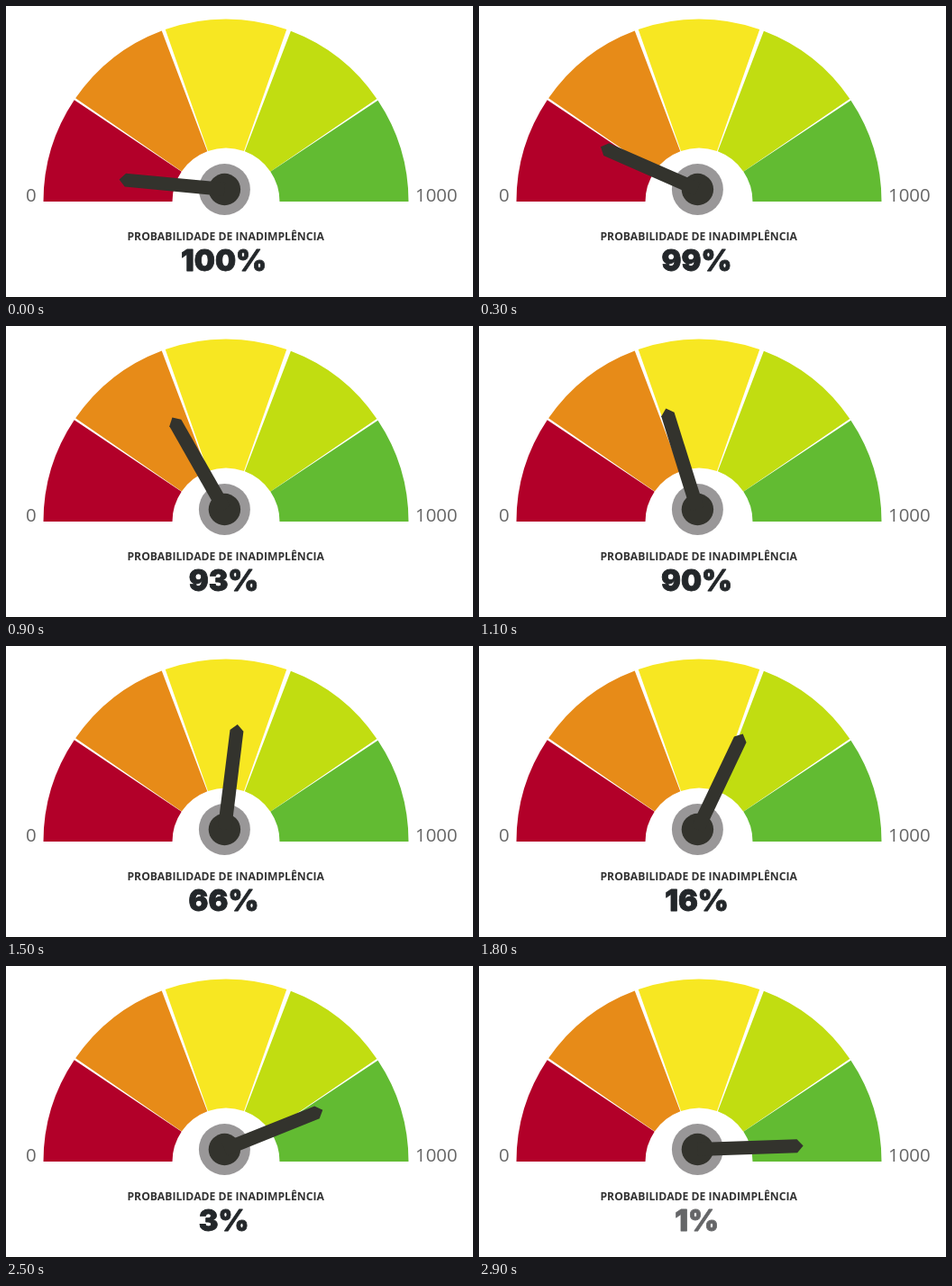
These frames come from a looping animation (518x324 px, 3000 ms). An HTML page with a canvas:

```html
<!DOCTYPE html>
<html lang="pt">
<head>
<meta charset="utf-8">
<style>
  html, body { margin: 0; width: 100%; height: 100%; overflow: hidden; background: #fff; }
  canvas { display: block; }
</style>
</head>
<body>
<canvas id="stage" width="518" height="324"></canvas>
<script>
const ctx = document.getElementById('stage').getContext('2d');
const LOOP = 3000, STEP = 100;
const DARK = '#33332d';
const dial = { x: 244, y: 217, inner: 59.5, outer: 202.5 };
const hub = { x: 242.4, y: 203.5 };

// Start and end angle in degrees, measured clockwise from the left.
const sectors = [
  ['#b20029', 0, 33.8],
  ['#e78b18', 34.5, 69.4],
  ['#f7e722', 70.6, 109.4],
  ['#c1dd11', 110.8, 145.7],
  ['#62bb32', 146.3, 180],
];

// Step number and the percentage reached there.
const risk = [[0, 100], [6, 97], [11, 90], [15, 66], [18, 16], [22, 5], [29, 1]];

const rad = deg => deg * Math.PI / 180;

function riskAt(step) {
  const i = Math.max(1, risk.findIndex(([s]) => s >= step));
  const [s0, v0] = risk[i - 1], [s1, v1] = risk[i];
  return Math.round(v0 + (v1 - v0) * (step - s0) / (s1 - s0));
}

function disc(x, y, r, color) {
  ctx.fillStyle = color;
  ctx.beginPath();
  ctx.arc(x, y, r, 0, 2 * Math.PI);
  ctx.fill();
}

function label(text, x, y, font, color, align = 'center') {
  ctx.font = font;
  ctx.fillStyle = color;
  ctx.textAlign = align;
  ctx.fillText(text, x, y);
}

function drawDial() {
  const flare = rad(0.25); // gaps narrow towards the hub
  for (const [color, from, to] of sectors) {
    const a = Math.PI + rad(from), b = Math.PI + rad(to);
    const innerA = from > 0 ? a - flare : a;
    const innerB = to < 180 ? b + flare : b;
    ctx.fillStyle = color;
    ctx.beginPath();
    ctx.arc(dial.x, dial.y, dial.outer, a, b);
    ctx.arc(dial.x, dial.y, dial.inner, innerB, innerA, true);
    ctx.fill();
  }
}

function drawNeedle(deg) {
  disc(hub.x, hub.y, 28.5, '#999798');
  disc(hub.x, hub.y, 17.7, DARK);
  ctx.save();
  ctx.translate(hub.x, hub.y);
  ctx.rotate(Math.PI + rad(deg));
  ctx.beginPath();
  for (const [x, y] of [[0, -7.6], [110.5, -7.5], [117.3, 0], [110.5, 7.5], [0, 7.6]]) ctx.lineTo(x, y);
  ctx.fill();
  ctx.restore();
}

function drawPercent(text, color) {
  label(text, 241.5, 294, '900 32.5px Inter, sans-serif', color);
  ctx.strokeStyle = color;
  ctx.lineWidth = 0.8;
  ctx.lineJoin = 'round';
  ctx.strokeText(text, 241.5, 294);
}

function draw(time) {
  const step = Math.floor(time % LOOP / STEP);
  ctx.fillStyle = '#fff';
  ctx.fillRect(0, 0, 518, 324);
  drawDial();
  drawNeedle(Math.min(5.4 + 6.11 * step, 178));

  label('0', 22, 217, '20.4px "Open Sans", sans-serif', '#666', 'left');
  label('1000', 454, 217, '20.4px "Open Sans", sans-serif', '#666', 'left');
  label('PROBABILIDADE DE INADIMPLÊNCIA', 243.7, 260, 'bold 12.2px "Open Sans", sans-serif', '#333');
  drawPercent(riskAt(step) + '%', step === 29 ? '#656668' : '#23272a');

  ctx.fillStyle = '#000';
  ctx.fillRect(0, 323, 518, 1);
}

const start = performance.now();
function tick() {
  draw(performance.now() - start);
  requestAnimationFrame(tick);
}
tick();
</script>
</body>
</html>
```
